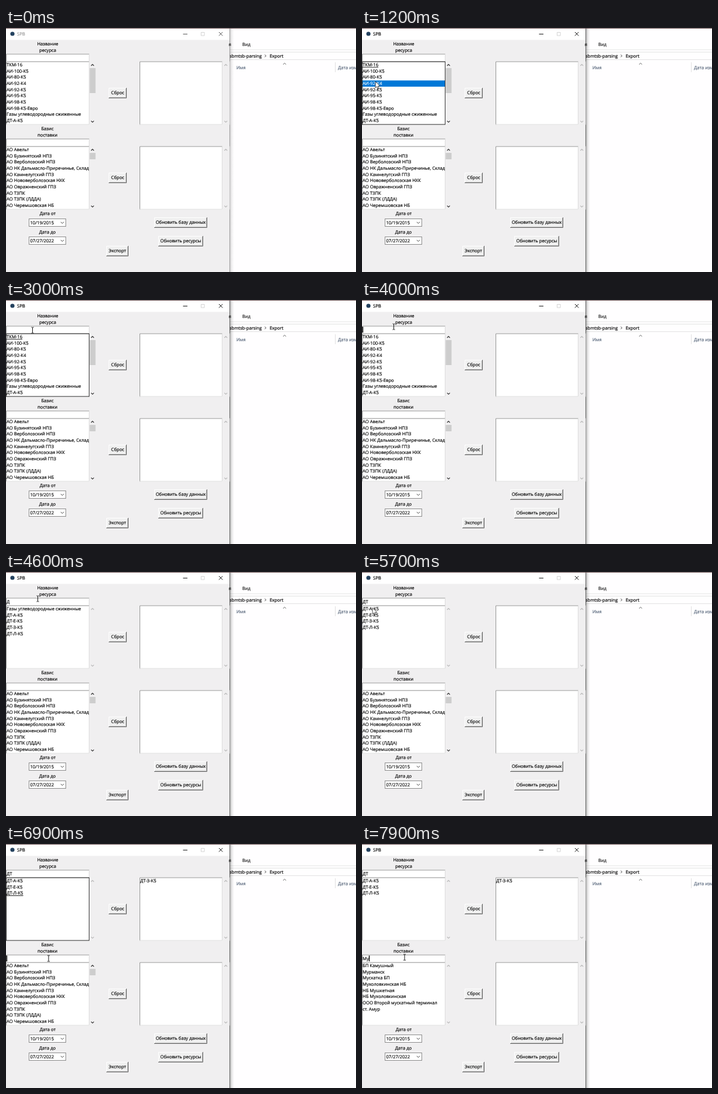
Recreate the animation shown at these times as an HTML page. Size 600 px wide and 420 px high, loop 8000 ms.

```html
<!DOCTYPE html>
<html lang="ru">
<head>
<meta charset="utf-8">
<title>SPB</title>
<style>
  html, body { margin: 0; width: 100%; height: 100%; overflow: hidden; background: #fff; }
  svg { display: block; width: 600px; height: 420px; }
  text {
    font: 7.65px "Open Sans", "Noto Sans", sans-serif; white-space: pre;
    text-rendering: geometricPrecision;
    fill: currentColor; stroke: currentColor; stroke-width: .16px;
  }
</style>
</head>
<body>
<svg viewBox="0 0 600 420">
  <defs>
    <linearGradient id="shadow">
      <stop offset="0" stop-opacity=".32"/><stop offset=".4" stop-opacity=".1"/><stop offset="1" stop-opacity="0"/>
    </linearGradient>
  </defs>
  <g id="scene"></g><g id="pointer"></g>
</svg>
<script>
const LOOP = 8000, STEP = 100, ROW = 10.67;
const scene = document.getElementById('scene');
const pointer = document.getElementById('pointer');

const fuels = ['ТКМ-16', 'АИ-100-К5', 'АИ-80-К5', 'АИ-92-К4', 'АИ-92-К5', 'АИ-95-К5',
  'АИ-98-К5', 'АИ-98-К5-Евро', 'Газы углеводородные сжиженные', 'ДТ-А-К5'];
const diesel = ['ДТ-А-К5', 'ДТ-Е-К5', 'ДТ-З-К5', 'ДТ-Л-К5'];
const bases = ['АО Авельт', 'АО Бузинятский НПЗ', 'АО Верболозский НПЗ',
  'АО НК Дальмасло-Приречинье, Склад', 'АО Камнелугский ГПЗ', 'АО Нововерболозская НХК',
  'АО Овражненский ГПЗ', 'АО ТЗПК', 'АО ТЗПК (ЛДДА)', 'АО Черемшовская НБ'];
const foundBases = ['БП Камушный', 'Мурманск', 'Мускатка БП', 'Мухоловкинская НБ', 'НБ Мушкетная',
  'НБ Мухоловкинская', 'ООО Второй мускатный терминал', 'ст. Амур'];
const without = (list, item) => list.filter(x => x !== item);

// Each step overrides part of the state from its time on.
const steps = [
  [0, { active: false, left: fuels, right: [], bases, scroll: true, entry1: '', entry2: '',
        focus: false, pick: -1, under: -1, caret: 0 }],
  [1200, { active: true, focus: true, pick: 3, under: 0 }],
  [1300, { left: [...without(fuels, 'АИ-92-К4'), 'ДТ-Е-К5'], right: ['АИ-92-К4'], pick: -1, under: 3 }],
  [2500, { left: fuels, right: [], under: 0 }],
  [3100, { focus: false, under: -1, caret: 1 }],
  [3700, { caret: 0 }],
  [4000, { caret: 1 }],
  [4400, { entry1: 'Д' }],
  [4600, { left: [fuels[8], ...diesel], scroll: false, caret: 0 }],
  [4700, { entry1: 'ДТ' }],
  [4900, { left: diesel, caret: 1 }],
  [5500, { caret: 0 }],
  [5800, { caret: 1 }],
  [6200, { focus: true, pick: 2, under: 0, caret: 0 }],
  [6300, { left: without(diesel, 'ДТ-З-К5'), right: ['ДТ-З-К5'], pick: -1, under: 2 }],
  [6900, { caret: 2 }],
  [7000, { focus: false, under: -1 }],
  [7500, { caret: 0 }],
  [7600, { entry2: 'М' }],
  [7700, { entry2: 'Му' }],
  [7800, { caret: 2 }],
  [7900, { bases: foundBases }]
];

const path = [[200, 316, 323], [1000, 23, 92], [1200, 23, 92], [1800, 266, 100], [2000, 266, 100],
  [2400, 192, 113], [2500, 192, 113], [2900, 60, 60], [3000, 45.5, 52], [3300, 45.5, 52],
  [3400, 54.5, 46], [5300, 54.5, 46], [5500, 40, 32], [5700, 18, 61.5], [6200, 20, 82],
  [6600, 185, 204], [6700, 185, 204], [6800, 193, 247], [6900, 73, 197], [7100, 73, 197],
  [7200, 73, 195], [LOOP, 73, 195]];

const rect = (x, y, w, h, fill, extra = '') =>
  `<rect x="${x}" y="${y}" width="${w}" height="${h}" fill="${fill}" ${extra}/>`;
const line = (d, color, width = 1) =>
  `<path d="${d}" fill="none" stroke="${color}" stroke-width="${width}"/>`;
const text = (x, y, s, color = '#000', extra = '') =>
  `<text x="${x}" y="${y}" color="${color}" ${extra}>${s}</text>`;
const centered = (x, y, s) => text(x, y, s, '#000', 'text-anchor="middle"');

function sunken(x, y, w, h) {
  return rect(x, y, w, h, '#fff') +
    line(`M${x + .5} ${y + h}V${y + .5}H${x + w}`, '#949494') +
    line(`M${x} ${y + h - .5}H${x + w - .5}V${y}`, '#dcdcdc');
}

function button(x, y, w, h, label) {
  return rect(x, y, w, h, '#f0f0f0') +
    line(`M${x + .5} ${y + h}V${y + .5}H${x + w}`, '#fff') +
    line(`M${x + 1} ${y + h - 1.5}H${x + w - 1.5}V${y + 1}`, '#b4b4b4') +
    line(`M${x} ${y + h - .5}H${x + w - .5}V${y}`, '#686868') +
    centered(x + w / 2, y + h / 2 + 2.4, label);
}

function scrollbar(x, y, thumb) {
  const color = thumb ? '#333' : '#b9b9b9', cx = x + 5.3;
  return rect(x, y, 12, 109, '#f0eff0') +
    (thumb ? rect(x + .5, y + 11.5, 10, thumb, '#cdcdcd') : '') +
    line(`M${cx - 2.4} ${y + 7.5}l2.4 -2.4l2.4 2.4`, color, 1.2) +
    line(`M${cx - 2.4} ${y + 102.3}l2.4 2.4l2.4 -2.4`, color, 1.2);
}

function listbox(x, y, items, thumb, { focus = false, pick = -1, under = -1 } = {}) {
  let out = sunken(x, y, x ? 142 : 143, 109);
  items.forEach((item, i) => {
    const top = y + .8 + i * ROW;
    if (i === pick) out += rect(x + 1, top, 141, ROW, '#0078d7');
    out += text(x + 1, top + 7.8, item, i === pick ? '#fff' : '#000',
      i === under ? 'text-decoration="underline"' : '');
  });
  out += scrollbar(x ? x + 142.5 : 143, y, thumb);
  if (focus) out += rect(x + .5, y + .5, 142, 108, 'none', 'stroke="#333"');
  return out;
}

function entry(y, value, caret) {
  return sunken(0, y, 143, 13.5) +
    text(1, y + 9, value, '#000', caret ? 'id="typed"' : '') +
    (caret ? rect(.7, y + 1.5, 1.4, 10, '#000', 'id="caret"') : '');
}

function dateBox(y, value) {
  return rect(39.5, y + .5, 63, 13, '#fff', 'stroke="#8a8a8a"') +
    text(41.5, y + 9.5, value) +
    line(`M93.9 ${y + 5.8}l2.6 2.6l2.6 -2.6`, '#444', 1);
}

function explorer() {
  return rect(384, 0, 216, 420, '#fffeff') +
    line('M384 37.5H600', '#e6e6e6') +
    text(405, 31.3, 'Вид', '#222') +
    line('M384 41.5H600M384 54.5H600', '#e2e2e2') +
    text(438.5, 50.5, 'sbmtsb-parsing', '#000', 'text-anchor="end"') +
    line('M443.5 45.8l2.2 2.2l-2.2 2.2', '#444', 1) + text(452, 50.5, 'Export') +
    line('M475 62.8l2.6 -2.4l2.6 2.4', '#666', 1) +
    text(395, 71.1, 'Имя', '#56657a') + text(569, 71.1, 'Дата изменения', '#56657a') +
    line('M564.5 59V76', '#dfdfdf');
}

function titleBar(active) {
  const ink = active ? '#000' : '#999', control = active ? '#111' : '#555';
  return rect(0, 0, 384, 20.5, '#fff') + '<circle cx="11" cy="10" r="3.6" fill="#24425f"/>' +
    text(19, 12.8, 'SPB', ink) +
    line('M303.5 10.5H311', control) +
    line('M334.5 7.5h5.6v5.6h-5.6z', '#cfcfcf', .9) +
    line('M365 7l6.4 6.4M371.4 7l-6.4 6.4', control);
}

function draw(s) {
  scene.innerHTML = explorer() +
    rect(384, 0, 7, 420, 'url(#shadow)', `opacity="${s.active ? 1 : .6}"`) +
    rect(0, 0, 384, 420, '#f0eff0') + titleBar(s.active) +
    rect(383, 0, 1, 420, s.active ? '#6f6f6f' : '#a2a2a2') +
    text(386, 31.3, 'я', '#222', 'text-anchor="end"') +
    rect(0, 0, 600, 1, '#6b5052') +
    centered(71.5, 30.4, 'Название') + centered(71.5, 40.6, 'ресурса') +
    entry(44.5, s.entry1, s.caret === 1) +
    listbox(0, 57.5, s.left, s.scroll ? 43 : 0, s) +
    listbox(229, 57.5, s.right, 0) +
    button(176, 103, 31, 18, 'Сброс') +
    centered(71, 176.4, 'Базис') + centered(71, 186.6, 'поставки') +
    entry(190.5, s.entry2, s.caret === 2) +
    listbox(0, 203.5, s.bases, s.bases === bases ? 11 : 0) +
    listbox(229, 203.5, [], 0) +
    button(176, 249, 31, 18, 'Сброс') +
    centered(71.5, 322.4, 'Дата от') + dateBox(328, '10/19/2015') +
    centered(71, 353.8, 'Дата до') + dateBox(359, '07/27/2022') +
    button(254, 326, 91, 18, 'Обновить базу данных') +
    button(261, 358, 77, 18, 'Обновить ресурсы') +
    button(172, 375, 38, 18, 'Экспорт');
  const typed = document.getElementById('typed');
  if (typed && typed.textContent) {
    document.getElementById('caret').setAttribute('x', 1 + typed.getComputedTextLength());
  }
}

function pointerAt(t) {
  const next = path.findIndex(p => p[0] >= t);
  if (next <= 0) return path[0].slice(1);
  const [t0, x0, y0] = path[next - 1], [t1, x1, y1] = path[next];
  const k = (t - t0) / (t1 - t0), e = k * k * (3 - 2 * k);
  return [x0 + (x1 - x0) * e, y0 + (y1 - y0) * e];
}

const arrow = '<path d="M0 0V11L2.6 8.7L4.3 12.5L6 11.8L4.4 8.1H7.8Z" fill="#fff" stroke="#222" stroke-width=".8"/>';
const beam = line('M-2 -5H-.6L0 -4.5L.6 -5H2M0 -4.5V4.5M-2 5H-.6L0 4.5L.6 5H2', '#111', 1);

function drawPointer(t) {
  const [x, y] = pointerAt(t);
  const overEntry = x < 143 && ((y >= 45 && y < 58) || (y >= 191 && y < 204));
  pointer.innerHTML = t < 100 ? '' : overEntry ? beam : arrow;
  pointer.setAttribute('transform', `translate(${x.toFixed(1)} ${y.toFixed(1)})`);
}

const start = performance.now();
let shown = -1;
function tick() {
  const t = Math.floor((performance.now() - start) % LOOP / STEP) * STEP;
  if (t !== shown) {
    shown = t;
    draw(Object.assign({}, ...steps.filter(s => s[0] <= t).map(s => s[1])));
    drawPointer(t);
  }
  requestAnimationFrame(tick);
}
tick();
</script>
</body>
</html>
```
